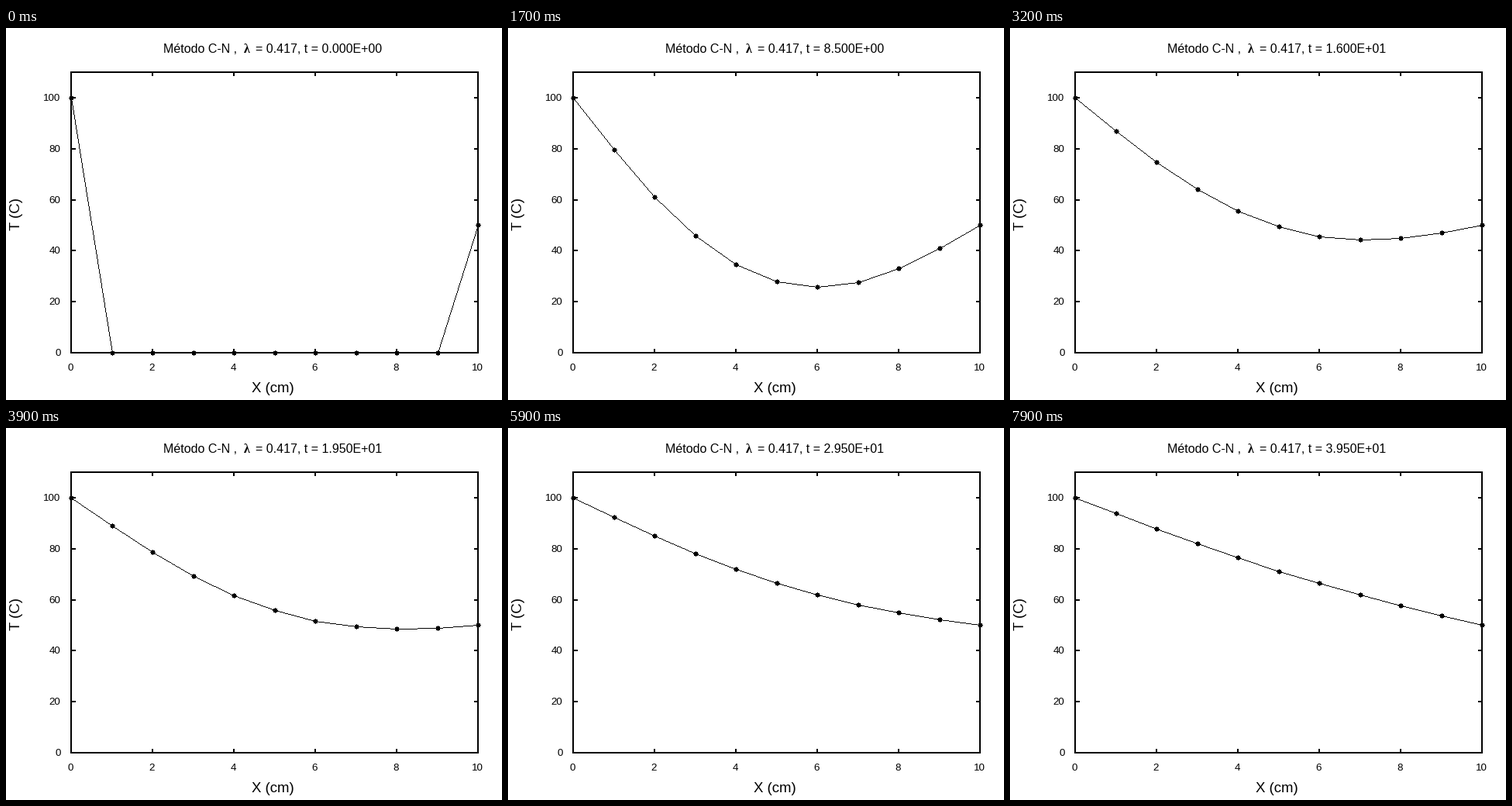
Animation of 640 by 480 pixels, one loop 8 s. Source, as a matplotlib script:

```python
import numpy as np
import matplotlib.pyplot as plt
from matplotlib.animation import FuncAnimation
from matplotlib.patches import Rectangle

W, H, DPI = 640, 480, 100
PT = 72 / DPI                              # points per pixel
LEFT, RIGHT, TOP, BOTTOM = 84, 609, 57, 419
FRAMES, DT, DIFFUSIVITY = 80, 0.5, 0.835
NODES, T_MAX = 11, 110

plt.rcParams["font.family"] = "Liberation Sans"


def solve():
    """Crank-Nicolson heat flow in a rod with fixed end temperatures."""
    lam = DIFFUSIVITY * DT
    lap = np.zeros((NODES, NODES))
    for i in range(1, NODES - 1):
        lap[i, i - 1:i + 2] = 1, -2, 1
    eye = np.eye(NODES)
    step = np.linalg.solve(eye - lam / 2 * lap, eye + lam / 2 * lap)
    temp = np.zeros(NODES)
    temp[0], temp[-1] = 100, 50
    rows = [temp]
    for _ in range(FRAMES - 1):
        rows.append(step @ rows[-1])
    return rows


def to_px(v):
    return np.floor(np.asarray(v) + 0.5).astype(int)


def x_px(x):
    return LEFT + x * (RIGHT - LEFT) / 10


def y_px(t):
    return BOTTOM - t * (BOTTOM - TOP) / T_MAX


def raster(temp):
    """Hard-edged one pixel polyline with a round dot at each node."""
    img = np.ones((H, W))
    xs, ys = to_px(x_px(np.arange(NODES))), to_px(y_px(temp))
    for x0, y0, x1, y1 in zip(xs, ys, xs[1:], ys[1:]):
        n = max(abs(x1 - x0), abs(y1 - y0)) + 1
        img[to_px(np.linspace(y0, y1, n)), to_px(np.linspace(x0, x1, n))] = 0
    dy, dx = np.mgrid[-3:4, -3:4]
    disc = dx**2 + dy**2 <= 9
    for x, y in zip(xs, ys):
        img[y + dy[disc], x + dx[disc]] = 0
    return img


history = solve()

fig = plt.figure(figsize=(W / DPI, H / DPI), dpi=DPI, facecolor="white")
ax = fig.add_axes([0, 0, 1, 1])
ax.axis("off")
curve = ax.imshow(raster(history[0]), cmap="gray", vmin=0, vmax=1,
                  extent=(0, W, H, 0), interpolation="nearest", aspect="auto")
ax.set_xlim(0, W)
ax.set_ylim(H, 0)


def label(x, y, s, size, **kw):
    return ax.text(x, y, s, fontsize=size * PT, va="baseline", color="black", **kw)


def tick(xs, ys):
    ax.plot(xs, ys, color="black", lw=2 * PT, solid_capstyle="butt", snap=True)


ax.add_patch(Rectangle((LEFT, TOP), RIGHT - LEFT, BOTTOM - TOP, fill=False,
                       ec="black", lw=2 * PT, joinstyle="miter", snap=True))
for v in range(0, 11, 2):
    x = int(x_px(v))
    if 0 < v < 10:
        tick([x, x], [TOP, TOP + 5])
        tick([x, x], [BOTTOM, BOTTOM - 5])
    label(x - 0.5, 442, str(v), 13.33, ha="center")
for v in range(0, 101, 20):
    y = int(to_px(y_px(v)))
    if v:
        tick([LEFT, LEFT + 6], [y, y])
        tick([RIGHT, RIGHT - 5], [y, y])
    label(70.5, y + 4, str(v), 13.33, ha="right")

label(344, 470, "X (cm)", 18.67, ha="center")
label(18, 240, "T (C)", 18.67, ha="center", rotation=90, rotation_mode="anchor")
label(203, 32, "Método C-N ,", 16)
label(310.5, 32, "λ", 16, ha="center", family="Liberation Serif", weight="bold")
clock = label(322.5, 32, "", 16)


def update(i):
    curve.set_data(raster(history[i]))
    clock.set_text(f"= 0.417, t = {i * DT:.3E}")
    return curve, clock


anim = FuncAnimation(fig, update, frames=FRAMES, interval=100,
                     repeat=True, repeat_delay=0, blit=False)
plt.show()
```
